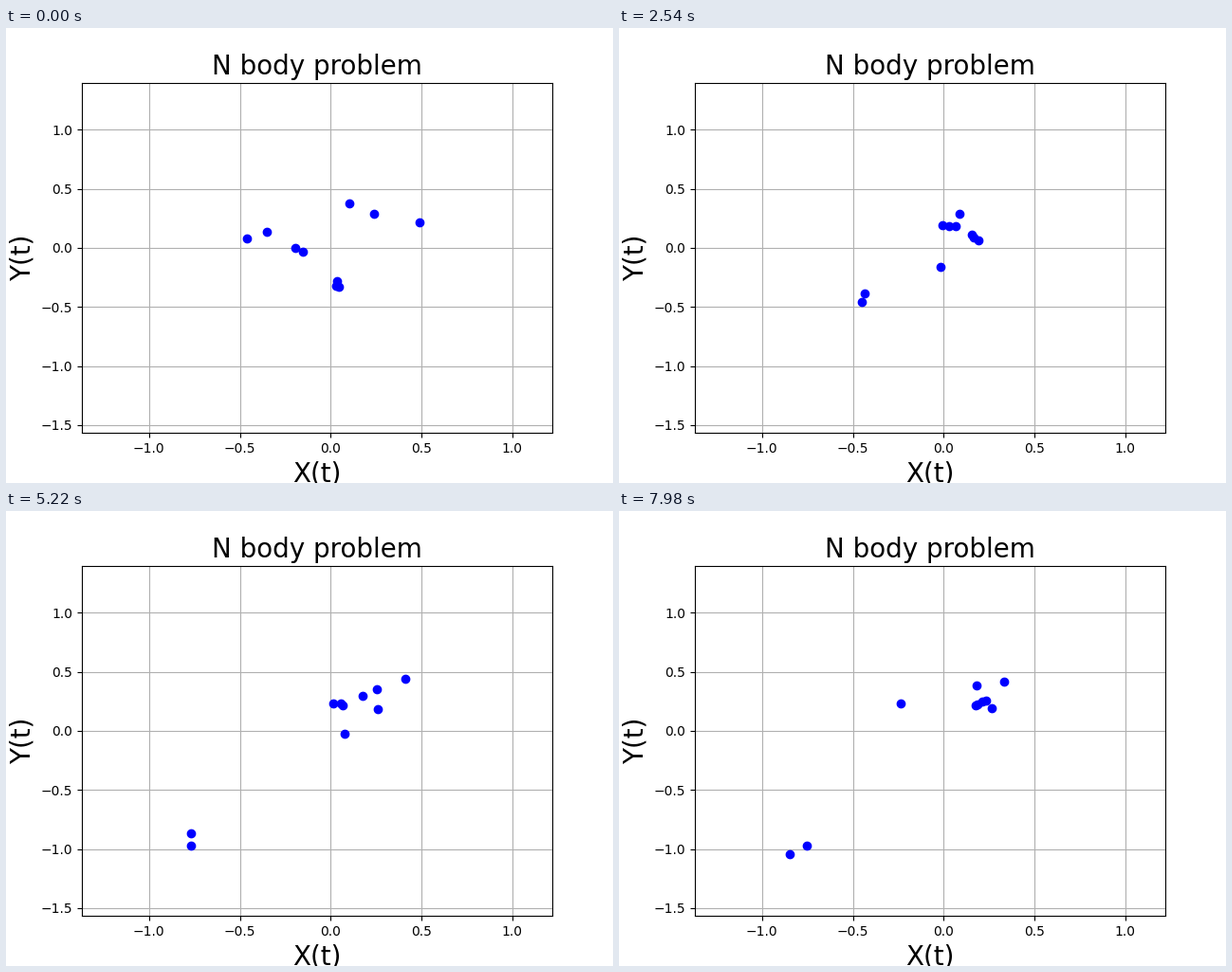
Recreate the animation shown at these times as a matplotlib script. Size 640 by 480 pixels, loop 8000 ms.

```python
import numpy as np
import matplotlib.pyplot as plt
from matplotlib.animation import FuncAnimation

W, H = 640, 480
FRAMES = 400
KEYS = np.array([0, 42, 127, 261, 399])
t = np.arange(FRAMES)


def glide(*points):
    """Smooth path from rest through one stage point per key moment."""
    p = np.array(points, float)
    slope = np.gradient(p, KEYS, axis=0)
    slope[0] = 0
    i = np.clip(np.searchsorted(KEYS, t, side="right") - 1, 0, len(KEYS) - 2)
    h = (KEYS[i + 1] - KEYS[i])[:, None]
    s = (t - KEYS[i])[:, None] / h
    ease = s * s * (3 - 2 * s)
    return (p[i] + (p[i + 1] - p[i]) * ease
            + h * s * (1 - s) * ((1 - s) * slope[i] - s * slope[i + 1]))


def ejected_pair():
    """Two bodies flung out, slowing to a turn, on a widening mutual orbit."""
    u = np.abs(355 - t) / 228
    x = np.minimum(309, 187.7 + 70 * u ** 2.5)
    y = np.maximum(234, 361 - 76.5 * u ** 1.9)
    angle = np.radians(32 + 1.8 * t + 0.0019 * t ** 2)
    radius = 4.5 + 6 * (t / FRAMES) ** 2.5
    centre = np.column_stack([x, y])
    arm = radius[:, None] * np.column_stack([np.cos(angle), np.sin(angle)])
    return [centre + arm, centre - arm]


swarm = [
    # falling in from the left
    glide((254, 222), (297, 233), (359, 196), (421, 177), (387, 200)),
    glide((275, 215), (298, 229), (372, 218), (376, 195), (383, 201)),
    # from the upper right
    glide((362, 185), (358, 198), (348, 209), (353, 203), (377, 184)),
    glide((388, 196), (379, 206), (355, 209), (355, 205), (378, 204)),
    glide((436, 205), (417, 210), (341, 208), (345, 203), (297, 203)),
    # from below
    glide((349, 267), (337, 253), (374, 221), (391, 188), (406, 180)),
    glide((348, 272), (337, 256), (379, 224), (392, 209), (393, 208)),
    glide((351, 273), (339, 256), (339, 252), (357, 235), (376, 205)),
]

fig, ax = plt.subplots(figsize=(W / 100, H / 100), dpi=100)
ax.set_xlim(-1.3695, 1.2205)
ax.set_ylim(-1.567, 1.399)
ax.grid(True)
ax.set_title("N body problem", fontsize=20)
ax.set_xlabel("X(t)", fontsize=20)
ax.set_ylabel("Y(t)", fontsize=20)
dots, = ax.plot([], [], "bo")

# Stage pixels (y down) to axis units
pixels = np.array(ejected_pair() + swarm)
pixels[..., 1] = H - pixels[..., 1]
to_data = ax.transData.inverted()
paths = to_data.transform(pixels.reshape(-1, 2)).reshape(pixels.shape)


def update(frame):
    dots.set_data(paths[:, frame, 0], paths[:, frame, 1])
    return dots,


anim = FuncAnimation(fig, update, frames=FRAMES, interval=20,
                     repeat=True, repeat_delay=0)
plt.show()
```
